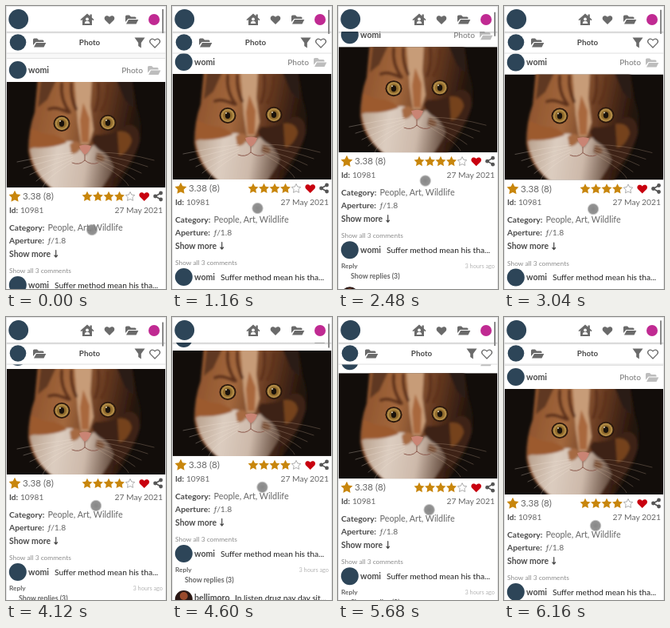
Recreate the animation shown at these times as an HTML page. Size 201 by 354 pixels, loop 6200 ms.

```html
<!DOCTYPE html>
<html lang="en">
<head>
<meta charset="utf-8">
<title>Photo page</title>
<style>
  html, body { margin: 0; width: 100%; height: 100%; overflow: hidden; background: #fff; }
  svg { display: block; width: 100%; height: 100%; }
  text { font-family: Lato, "Open Sans", sans-serif; fill: #666; }
  .b { font-weight: bold; fill: #4a4a4a; }
</style>
</head>
<body>
<svg id="stage" viewBox="0 0 201 354" xmlns="http://www.w3.org/2000/svg"></svg>
<script>
const LOOP = 6200, STEP = 40, TOP = 95;
const GREY = '#6a6a6a', GOLD = '#c8860c', NAVY = '#2d4558';

// Shape helpers: each returns SVG markup.
const label = (x, y, size, str, attrs = '') =>
  `<text x="${x}" y="${y}" font-size="${size}" ${attrs}>${str}</text>`;
const at = (x, y, body) => `<g transform="translate(${x} ${y})">${body}</g>`;
const path = (d, attrs) => `<path d="${d}" ${attrs}/>`;
const fill = c => `fill="${c}"`;
const line = (c, w = 1) => `fill="none" stroke="${c}" stroke-width="${w}" stroke-linecap="round" stroke-linejoin="round"`;
const disc = (x, y, r, c = NAVY) => `<circle cx="${x}" cy="${y}" r="${r}" fill="${c}"/>`;
const rect = (x, y, w, h, c) => `<rect x="${x}" y="${y}" width="${w}" height="${h}" fill="${c}"/>`;

function star(x, y, r, attrs) {
  const pts = Array.from({ length: 10 }, (_, i) => {
    const a = (i / 5 - 0.5) * Math.PI, q = i % 2 ? r * 0.5 : r;
    return `${(q * Math.cos(a)).toFixed(2)},${(q * Math.sin(a)).toFixed(2)}`;
  });
  return at(x, y, `<polygon points="${pts.join(' ')}" stroke-linejoin="round" ${attrs}/>`);
}
const heart = (x, y, attrs) => at(x, y,
  path('M0 5.8L-5.6 .2C-8-3.2-4-7.2 0-3.4C4-7.2 8-3.2 5.6 .2Z', attrs));
const folder = (x, y, c) => at(x, y,
  path('M-8 3V-4Q-8-5.5-6.5-5.5H-3L-1-3.5H4Q5.5-3.5 5.5-2V-1H-4.5Z', fill(c)) +
  path('M-4 0H8.3L5.5 5.5H-7Z', fill(c)));
const house = (x, y) => at(x, y,
  path('M-8.5 0L0-7.5L3.5-4.4V-6.5H5.8V-2.4L8.5 0L7.5 1.2L6 0V7H-6V0L-7.5 1.2Z', fill(GREY)) +
  disc(0, -0.6, 1.9, '#fff') + path('M-3.2 5Q-3 1.8 0 1.8T3.2 5Z', fill('#fff')));
const funnel = (x, y) => at(x, y,
  path('M-6.5-6.5H6.5L1.8 0V6.5L-1.8 4V0Z', fill(GREY)));
const share = (x, y) => at(x, y,
  path('M3.5-4L-3.5 0L3.5 4', line('#555', 1.6)) +
  disc(3.5, -4, 2.4, '#555') + disc(-3.5, 0, 2.4, '#555') + disc(3.5, 4, 2.4, '#555'));

function eye(x, y) {
  return at(x, y,
    `<ellipse rx="10.5" ry="10" fill="#2a170c"/><ellipse rx="8.6" ry="8.2" fill="#b08a45"/>` +
    `<circle r="6" fill="#8f6a2c"/><ellipse rx="3.2" ry="4" fill="#1a120a"/>` + disc(-2, -3, 1, '#d8cdb4'));
}

function whiskers() {
  let out = '';
  for (let i = 0; i < 5; i++) {
    out += path(`M84 ${88 + i * 3}Q50 ${92 + i * 7} ${14 + i * 8} ${100 + i * 8}`, line('#f3e5d6', 0.5));
    out += path(`M114 ${88 + i * 3}Q150 ${88 + i * 8} ${186 - i * 8} ${98 + i * 8}`, line('#c8ad95', 0.5));
  }
  return `<g opacity=".6">${out}</g>`;
}

function photo() {
  return `<svg x="1" y="0" width="199" height="132" viewBox="1 0 199 132">` +
    rect(0, 0, 201, 132, '#120d0a') +
    `<g filter="url(#soft)">` +
    path('M40 -4H158L164 32Q175 62 163 92Q154 112 136 136H60Q32 116 28 86Q28 60 36 38Z', 'fill="url(#fur)"') +
    path('M44 -4H64L52 22L40 32Z', fill('#5f3922')) +
    path('M138 -4H158L161 34L149 22Z', fill('#2c1a12')) +
    // forehead and bridge
    path('M86 -4H108L106 30L110 60L104 78H94L90 50Z', fill('#c79c78')) +
    path('M97 26L105 46L104 76H95L93 48Z', fill('#a9683c')) +
    path('M70 2Q68 22 80 38M82 2Q81 20 88 34M116 2Q118 22 112 36M128 4Q128 22 120 36M54 34Q62 30 78 38', line('#5e331b', 4)) +
    // cheeks, muzzle and shadow side
    path('M30 84Q50 74 70 76Q86 70 92 82L100 92L108 80Q122 76 134 86Q140 102 130 118L118 136H62Q36 118 30 84Z', 'fill="url(#white)"') +
    path('M32 58Q48 66 60 66Q72 70 76 76Q56 84 31 82Z', fill('#9c5a2f')) +
    path('M80 78Q90 70 95 80Q92 90 82 90Z', fill('#a66b42')) +
    path('M112 66Q136 68 152 54Q168 52 168 74Q158 104 138 120Q136 98 122 88Q110 82 108 72Z', fill('#3d2316')) +
    path('M140 62Q156 60 158 74Q152 90 142 92Z', fill('#74421f')) +
    path('M114 88Q124 90 124 98Q118 102 112 97Z', fill('#7a523a')) +
    `</g>` +
    eye(70, 52) + eye(128, 51) +
    path('M92 80Q99 77 107 80Q105 88 99 91Q94 87 92 80Z', fill('#c98474')) +
    path('M99 91V98Q92 105 83 101M99 98Q107 105 116 101', line('#8c5a4d', 1)) +
    whiskers() + `</svg>`;
}

// Page content; y = 0 is the top edge of the photo.
function page() {
  const row = y => y + 3.7;
  let out = rect(1, -29, 199, 400, '#fff') + rect(1, -30, 199, 0.8, '#ddd') +
    disc(14.8, -15, 11) + label(28, row(-15), 10.6, 'womi', 'class="b"') +
    label(172, row(-15), 10.2, 'Photo', 'text-anchor="end" style="fill:#777"') +
    folder(186, -14.5, '#bdbdbd') + photo() +
    star(11, 143.5, 7.8, fill(GOLD)) + label(21, 147, 11.6, '3.38 (8)');
  for (let i = 0; i < 5; i++) {
    out += star(102 + i * 13.5, 143.5, i < 4 ? 6.8 : 6,
      i < 4 ? fill(GOLD) : 'fill="#fff" stroke="#999" stroke-width=".8"');
  }
  return out + heart(173.7, 143.3, fill('#c8000f')) + share(191, 143) +
    label(4, row(160), 10, 'Id:', 'class="b"') + label(18, row(160), 10.1, '10981') +
    label(197, row(160), 10.3, '27 May 2021', 'text-anchor="end"') +
    label(4, row(182), 10.3, 'Category:', 'class="b"') + label(52.5, row(182), 10.8, 'People, Art, Wildlife') +
    label(4, row(198), 10.3, 'Aperture:', 'class="b"') + label(53, row(198), 10.3, '<tspan font-style="italic">ƒ</tspan>/1.8') +
    label(4, row(215), 10.4, 'Show more', 'class="b"') +
    path('M62.7 210.5V219M60.9 217L62.7 219.2L64.5 217', line('#444', 1.2)) +
    label(4, 239, 8.4, 'Show all 3 comments', 'style="fill:#8c8c8c"') +
    disc(14.8, 254, 11) + label(28, row(254), 10.6, 'womi', 'class="b"') +
    label(61, row(254), 10.2, 'Suffer method mean his tha...', 'style="fill:#222"') +
    label(4, 277, 8.3, 'Reply', 'class="b" style="fill:#666"') +
    label(197, 277, 7.3, '3 hours ago', 'text-anchor="end" style="fill:#b5b5b5"') +
    label(16, 290, 8.8, 'Show replies (3)', 'class="b" style="fill:#666"') +
    disc(14.8, 311, 11, '#2a1815') + disc(14.8, 307, 5, '#9a4a2c') +
    label(28, row(309), 10.6, 'bellimoro', 'class="b"') +
    label(79, row(309), 10.2, 'In listen drug pay day sit...', 'style="fill:#222"');
}

const toolbar = rect(0, 30, 201, 29, '#fff') + rect(0, 58.6, 201, 0.9, '#ddd') +
  disc(15, 45.5, 10.3) + folder(42, 46, GREY) +
  label(105, 49, 9.8, 'Photo', 'class="b" text-anchor="middle"') +
  funnel(168, 46) + heart(187, 46.2, line(GREY, 1.3));

const header = rect(0, 0, 201, 32, '#fff') + rect(0, 32, 201, 3, 'url(#shade)') +
  rect(0, 0, 201, 0.8, '#ddd') + disc(15.7, 16.5, 12.4) + house(102, 17) +
  heart(130, 17.2, fill(GREY)) + folder(158, 17, GREY) + disc(186, 17, 7, '#c02a92');

const gradient = (id, x2, y2, ...stops) =>
  `<linearGradient id="${id}" x2="${x2}" y2="${y2}">` +
  stops.map(([o, c, a = 1]) => `<stop offset="${o}" stop-color="${c}" stop-opacity="${a}"/>`).join('') +
  `</linearGradient>`;

document.getElementById('stage').innerHTML = `<defs>` +
  gradient('fur', 1, 0.2, [0, '#8a4f2a'], [0.4, '#a3683d'], [0.7, '#643820'], [1, '#20120b']) +
  gradient('white', 1, 0.1, [0, '#b8a08c'], [0.35, '#dccdc0'], [0.7, '#cdb9aa'], [1, '#6e5648']) +
  gradient('shade', 0, 1, [0, '#000', 0.22], [1, '#000', 0]) +
  `<radialGradient id="touch"><stop offset="0" stop-color="#7a7a7a" stop-opacity=".9"/>` +
  `<stop offset=".75" stop-color="#808080" stop-opacity=".85"/><stop offset="1" stop-color="#999" stop-opacity=".1"/></radialGradient>` +
  `<filter id="soft" x="-20%" y="-20%" width="140%" height="140%"><feGaussianBlur stdDeviation="1.8"/></filter></defs>` +
  rect(0, 0, 201, 354, '#f8f8f8') +
  `<g id="page">${page()}</g><g id="toolbar">${toolbar}</g>${header}` +
  `<rect id="thumb" x="196" width="2" height="30" fill="#8a8a8a"/>` +
  rect(0, 0, 0.8, 354, '#ddd') + rect(200.2, 0, 0.8, 354, '#ddd') +
  `<circle id="touchDot" r="7.6" fill="url(#touch)"/>`;

const [pageEl, toolbarEl, thumbEl, dotEl] =
  ['page', 'toolbar', 'thumb', 'touchDot'].map(id => document.getElementById(id));

// Monotone cubic curve through [time, value] points.
function curve(keys) {
  const slope = i => (keys[i + 1][1] - keys[i][1]) / (keys[i + 1][0] - keys[i][0]);
  const tangent = i => {
    if (i === 0 || i === keys.length - 1) return slope(Math.max(0, i - 1));
    const a = slope(i - 1), b = slope(i);
    return a * b > 0 ? 2 * a * b / (a + b) : 0;
  };
  return t => {
    let i = 0;
    while (i < keys.length - 2 && t > keys[i + 1][0]) i++;
    const [t0, v0] = keys[i], [t1, v1] = keys[i + 1], d = t1 - t0;
    const u = Math.min(1, Math.max(0, (t - t0) / d)), w = 1 - u;
    return v0 * w * w * (1 + 2 * u) + v1 * u * u * (3 - 2 * u) +
      d * u * w * (tangent(i) * w - tangent(i + 1) * u);
  };
}

const photoTop = curve([[0, TOP], [840, TOP], [1160, 85], [1840, 43], [2040, 38], [2120, 38],
  [3040, 85.5], [3400, TOP], [3520, TOP], [4120, 65], [4840, 37], [4920, 37], [5200, 48], [6160, 90], [6200, 91]]);
const approach = curve([[0, 280], [200, 272], [400, 272], [600, 263], [840, 263]]);
const grip = curve([[0, 168], [1160, 168], [1840, 167], [3040, 168.5], [3400, 171], [LOOP, 171]]);
const touchX = curve([[0, 108], [1160, 107.5], [1840, 107.5], [3040, 112], [4120, 113], [5200, 114], [6160, 115], [6200, 115]]);

function draw(t) {
  const top = photoTop(t), scroll = TOP - top;
  const hide = Math.min(1, Math.max(0, (scroll - 31) / 14));
  pageEl.setAttribute('transform', `translate(0 ${top})`);
  toolbarEl.setAttribute('transform', `translate(0 ${-32 * hide * hide * (3 - 2 * hide)})`);
  thumbEl.setAttribute('y', 4 + scroll * 0.085);
  dotEl.setAttribute('cx', touchX(t));
  dotEl.setAttribute('cy', t <= 840 ? approach(t) : top + grip(t));
}

const start = performance.now();
function tick() {
  const t = Math.max(0, performance.now() - start) % LOOP;
  draw(Math.floor(t / STEP) * STEP);
  requestAnimationFrame(tick);
}
tick();
</script>
</body>
</html>
```
